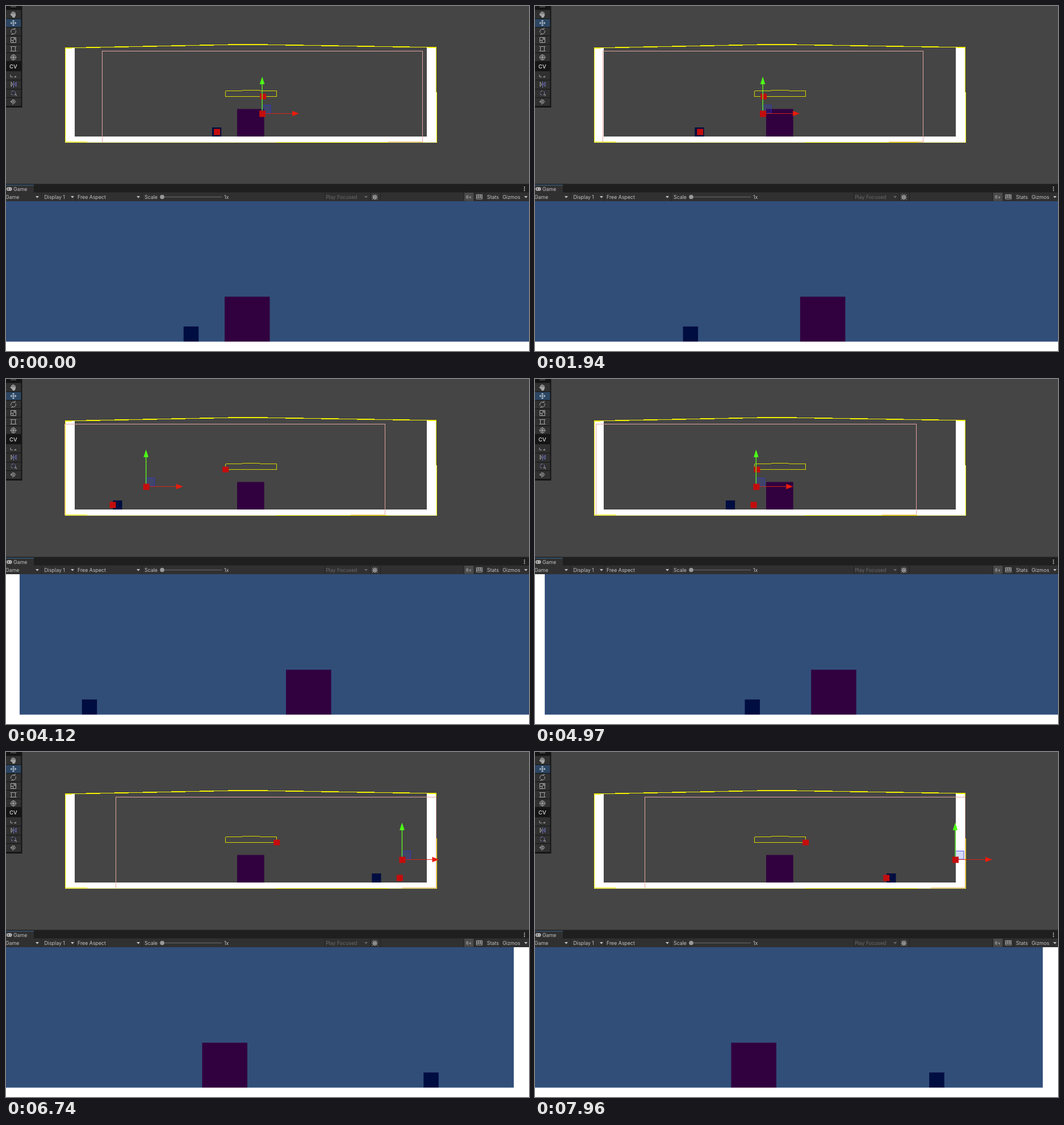
Write an HTML page that moves like this. It is 921 px wide and 608 px high and loops after 7.99 s.

```html
<!DOCTYPE html>
<html lang="en">
<head>
<meta charset="utf-8">
<title>Camera follow demo</title>
<style>
html, body { margin: 0; width: 100%; height: 100%; overflow: hidden; background: #454545; }
svg { display: block; }
text { font: 8.8px Inter, "Liberation Sans", sans-serif; fill: #c2c2c2; }
.icon { fill: none; stroke: #a8a8a8; stroke-width: 1; }
.crisp { shape-rendering: crispEdges; }
.purple { fill: #31003f; }
.navy { fill: #000d40; }
.red { fill: #c40d0d; }
</style>
</head>
<body>
<svg width="921" height="608" viewBox="0 0 921 608">
  <rect width="921" height="608" fill="#454545"/>

  <!-- scene view -->
  <path class="crisp" fill="#fff" d="M104 73H121V230H741V73H758V240H104Z"/>
  <g class="crisp" fill="none" stroke="#f2f200">
    <path stroke-width="1.5" d="M104 74L404 68H445L758 73"/>
    <path d="M104.5 73V240"/>
    <path stroke="#e4e47c" d="M104 240.5H759"/>
    <path d="M104 239.5H143M475 240.5H674"/>
    <path stroke-width="1.3" d="M757.5 73V152M758.5 152V207M758.5 207V241"/>
    <path stroke="#d6d600" d="M386.5 149.5H416M416 148.5H447M447 149.5H476.500V159.500H386.500V149.500"/>
  </g>
  <rect class="purple" x="407" y="181.500" width="47.700" height="48.500"/>
  <rect id="hero" class="navy" y="214" width="16.200" height="16"/>
  <g id="frame" class="crisp" fill="none" stroke="#e3a6a0">
    <path d="M-281.500 240V79.500H282.500V240"/>
    <path stroke="#e8b060" d="M222 239.500H282"/>
  </g>
  <rect id="look" class="red" x="-5" y="216.500" width="11" height="11"/>
  <rect id="cam" class="red" x="-4" y="154.500" width="11" height="10"/>
  <g id="aim">
    <rect x=".5" y="174.500" width="14.500" height="14.500" fill="#3048ff" fill-opacity=".2" stroke="#3038c8" stroke-opacity=".8"/>
    <path d="M0 189.500H54" stroke="#d02418" stroke-width="1.200"/>
    <path d="M53 184.800L65 189.500L53 194.200Z" fill="#e81c0c"/>
    <path d="M0 189V137" stroke="#62f022" stroke-width="1.400"/>
    <path d="M-4.300 137.800L0 124.500L4.300 137.800Z" fill="#4cff14"/>
    <rect class="red" x="-5" y="184.500" width="11" height="11"/>
  </g>

  <!-- tool strip -->
  <rect width="28.500" height="179" fill="#151515"/>
  <path d="M8 1.500H18" stroke="#777"/>
  <g id="tools"></g>
  <text x="6" y="110" style="font-size:9.500px;font-weight:500;fill:#e0e0e0">CV</text>
  <g class="icon">
    <path d="M10 17L8 14M10 17V11M12 16V9.500M14 16V10M16 17V11.500" stroke-width="1.400"/>
    <path d="M10 15H17L15 20H12Z" fill="#a8a8a8"/>
    <path d="M8 30H18M13 25V35M10 28L8 30L10 32M16 28L18 30L16 32M11 27L13 25L15 27M11 33L13 35L15 33" stroke="#c8d4e0"/>
    <path d="M9 47A4.500 4.500 0 0 1 15 41M17 43A4.500 4.500 0 0 1 11 49M13 41H16V38.500M13 49H10V51"/>
    <path d="M8.500 55.500H17.500V64.500H8.500ZM8.500 60.500H12.500V64.500M12 61L16 57M13 57H16V60"/>
    <path d="M9.500 71.500H16.500V79.500H9.500ZM7.500 71.500H9M17 71.500H18.500M7.500 79.500H9M17 79.500H18.500"/>
    <circle cx="13" cy="90.500" r="4.500"/>
    <path d="M7.500 90.500H18.500M13 85V96M10 87L16 94M16 87L10 94"/>
    <path d="M8 121V125H12M14 125H18M17 123V126"/>
    <path d="M9 134V142L12 138Z"/>
    <path d="M13.500 133V144M18 134V142L15 138Z" stroke="#7474c8"/>
    <circle cx="13" cy="153.500" r="4" stroke="#7d7dba" stroke-dasharray="5 2"/>
    <path d="M15 156H18V159"/>
    <path d="M12 164V174M8 168.500H11M11 166L8 168.500L11 171M14 165L17 168.500L14 172Z"/>
  </g>

  <!-- game panel header -->
  <rect y="313.500" width="921" height="31" fill="#1f1f1f"/>
  <rect y="315" width="49" height="14" fill="#303030"/>
  <rect y="315" width="49" height="1.300" fill="#365b80"/>
  <rect y="328.500" width="921" height="15.500" fill="#303030"/>
  <rect x="1" y="319.500" width="9.500" height="6" rx="2.800" fill="#c2c2c2"/>
  <path d="M2.500 322.500H5.500M4 321V324M7 322.500H9" stroke="#303030"/>
  <text x="13" y="325.500">Game</text>
  <path d="M912 318.500h2v1.500h-2zM912 321.500h2v1.500h-2zM912 324.500h2v1.500h-2z" fill="#c2c2c2"/>
  <rect x="806.500" y="329" width="17" height="14.500" fill="#4a4a4a"/>
  <g id="seps" stroke="#222"></g>
  <g id="labels"></g>
  <path d="M272 336.500H380" stroke="#5c5c5c" stroke-width="1.500"/>
  <circle cx="275" cy="336.500" r="3.800" fill="#999"/>
  <g class="icon" stroke="#c2c2c2">
    <ellipse cx="649.500" cy="337" rx="2.700" ry="4" fill="#777"/>
    <path d="M644.500 333L647 335M644 337H655M644.500 341L647 339M654.500 333L652 335M654.500 341L652 339M648 332L647 331M651 332L652 331"/>
    <path d="M811 334V339M813 333V340M815 336L818 339M818 335V339"/>
    <path d="M828.500 332.500H838.500V340H828.500ZM828.500 335H838.500M828.500 337.500H838.500M832 332.500V337.500M835.500 332.500V337.500"/>
  </g>

  <!-- game view -->
  <rect y="344" width="921" height="248" fill="#314e79"/>
  <rect id="wallL" y="344" width="200" height="248" fill="#fff"/>
  <rect id="wallR" y="344" width="200" height="248" fill="#fff"/>
  <rect id="block" class="purple" y="512.300" width="79.500" height="79.700"/>
  <rect id="heroBig" class="navy" y="564.800" width="26.500" height="27"/>
  <rect y="591.500" width="921" height="17" fill="#fff"/>
</svg>
<script>
const $ = id => document.getElementById(id);

// static chrome
[[7, 15], [23, 14], [38, 14], [53, 14], [68, 14], [83, 14], [115, 15], [131, 15], [147, 14], [162, 14]]
  .forEach(([y, h]) => $('tools').innerHTML +=
    `<rect x="0" y="${y}" width="26.500" height="${h}" fill="${y === 23 ? '#2c4662' : '#303030'}"/>`);
[62, 122, 239, 561, 641, 659, 806, 824, 843, 871]
  .forEach(x => $('seps').innerHTML += `<path d="M${x}.500 329V344"/>`);
[[-1, 'Game', 55], [67.500, 'Display 1', 117], [126, 'Free Aspect', 233], [244, 'Scale'], [384, '1x'],
 [563, 'Play Focused', 634], [847, 'Stats'], [874.500, 'Gizmos', 915.500]]
  .forEach(([x, word, arrow]) => {
    const fill = word === 'Play Focused' ? '#696969' : '#c2c2c2';
    $('labels').innerHTML += `<text x="${x}" y="339.500" style="fill:${fill}">${word}</text>` +
      (arrow ? `<path d="M${arrow - 3} 335H${arrow + 3}L${arrow} 338.500Z" fill="${fill}"/>` : '');
  });

const LOOP = 7990, LAG = 200, AHEAD = 80, ZOOM = 1.643;
const CAM_MIN = 385.2, CAM_MAX = 475.2;

// [ms, x] centre of the hero in the scene
const heroPath = [[0, 371.1], [1475, 371.1], [2100, 261.7], [2157, 261.7], [2914, 129.2], [3737, 129.2],
  [4120, 196.2], [5680, 467.2], [6740, 652.2], [7198, 732.8], [7362, 732.8], [7990, 622.3]];
// [ms, dx] look-ahead marker relative to the hero
const lookPath = [[0, 0], [1940, 0.8], [2430, -39.5], [3737, -39.5], [4120, -9], [4730, 40.5],
  [7362, 40.5], [7990, -11.5]];

function at(path, t) {
  const i = Math.max(1, path.findIndex(k => k[0] >= t));
  const [t0, a] = path[i - 1], [t1, b] = path[i];
  return a + (b - a) * (t - t0) / (t1 - t0);
}

// aim point trails the hero with an exponential lag
const STEP = 5, aimPath = [];
for (let t = 0, x = heroPath[0][1] + AHEAD; t <= LOOP; t += STEP) {
  aimPath.push(x);
  x += (at(heroPath, t + STEP / 2 > LOOP ? LOOP : t + STEP / 2) + AHEAD - x) * (1 - Math.exp(-STEP / LAG));
}
function aimAt(t) {
  const i = Math.min(aimPath.length - 2, Math.floor(t / STEP));
  return aimPath[i] + (aimPath[i + 1] - aimPath[i]) * (t / STEP - i);
}

const shift = (id, x) => $(id).setAttribute('transform', `translate(${x.toFixed(2)} 0)`);

function draw(t) {
  const hero = at(heroPath, t), aim = aimAt(t);
  const cam = Math.min(CAM_MAX, Math.max(CAM_MIN, aim));
  const block = 385 + (451.1 - cam) * 1.64;
  const toGame = x => block + (x - 407) * ZOOM;
  shift('hero', hero - 8.1);
  shift('look', hero + at(lookPath, t));
  shift('aim', aim);
  shift('cam', cam);
  shift('frame', Math.round(cam));
  shift('block', block);
  shift('heroBig', toGame(hero - 8.1));
  shift('wallL', toGame(121.5) - 200);
  shift('wallR', toGame(741));
}

const start = performance.now();
function tick() {
  draw((performance.now() - start) % LOOP);
  requestAnimationFrame(tick);
}
tick();
</script>
</body>
</html>
```
